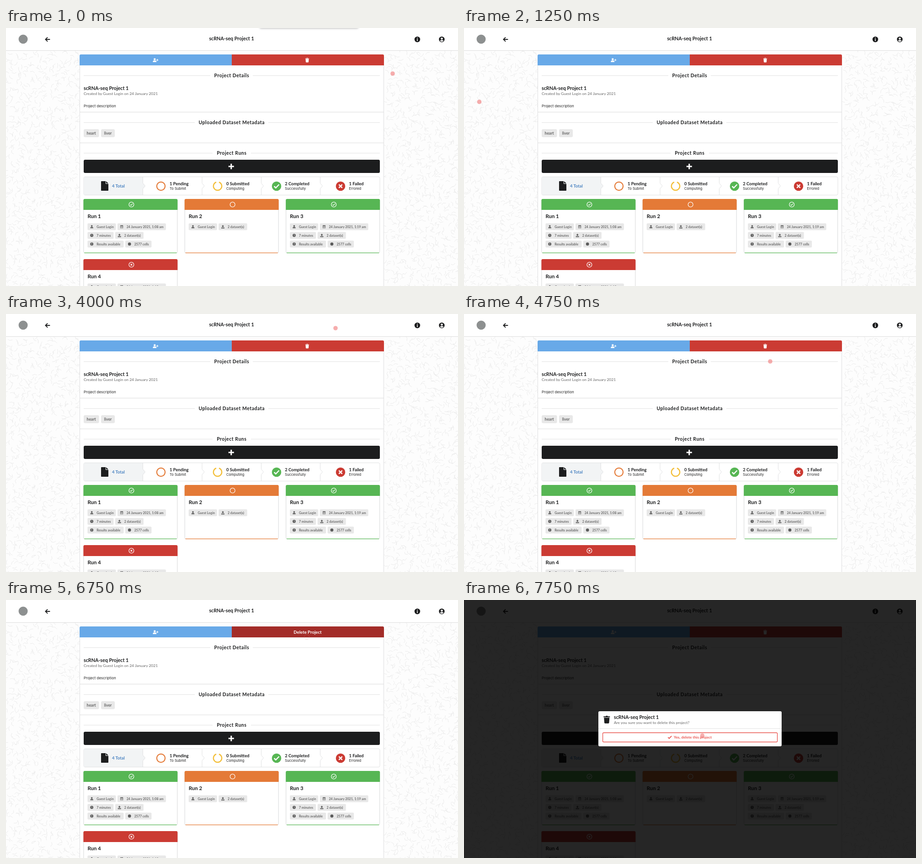
Write an HTML page that moves like this. It is 989 px wide and 566 px high and loops after 8000 ms.

```html
<!DOCTYPE html>
<html lang="en">
<head>
<meta charset="utf-8">
<title>Project page</title>
<style>
  html, body { margin: 0; width: 100%; height: 100%; overflow: hidden; background: #fdfdfd; }
  svg { display: block; width: 989px; height: 566px; }
  text { font-family: Lato, sans-serif; fill: #1c1d1e; }
  .b { font-weight: 700; }
  .mid { text-anchor: middle; }
  .head { font-size: 10.7px; }
  .divider { font-size: 10.5px; letter-spacing: .05em; }
  .sub { font-size: 8.45px; fill: #666; }
  .plain { font-family: Inter, sans-serif; font-size: 7.6px; fill: #222; }
  .step { font-size: 9.4px; }
  .tag { font-size: 8.6px; fill: #666; }
  .tiny { font-size: 7.1px; fill: #6a6a6a; }
  .line { fill: none; stroke: #e0e1e2; }
</style>
</head>
<body>
<svg id="stage" viewBox="0 0 989 566"></svg>
<script>
const RED = '#cb3b33', GREEN = '#57b654', ORANGE = '#e47a37', YELLOW = '#f3bf3b', INK = '#1c1d1e', GREY = '#5c5c5c';
const USER = 'Guest Login';

const rect = (x, y, w, h, fill, rx = 0, extra = '') =>
  `<rect x="${x}" y="${y}" width="${w}" height="${h}" rx="${rx}" fill="${fill}" ${extra}/>`;
const text = (x, y, str, cls, extra = '') => `<text x="${x}" y="${y}" class="${cls}" ${extra}>${str}</text>`;
const disc = (x, y, r, fill) => `<circle cx="${x}" cy="${y}" r="${r}" fill="${fill}"/>`;
const ring = (x, y, r, color, w) => `<circle cx="${x}" cy="${y}" r="${r}" fill="none" stroke="${color}" stroke-width="${w}"/>`;
const stroke = (d, color, w, extra = '') =>
  `<path d="${d}" fill="none" stroke="${color}" stroke-width="${w}" ${extra}/>`;
const at = (x, y, s, body) => `<g transform="translate(${x} ${y}) scale(${s})">${body}</g>`;

// Icons are centred on 0,0 and about 10 units wide
const icon = {
  person: c => disc(0, -2.4, 2.6, c) + `<path d="M-4.6 5V3.6Q-4.6 .8-1.8 .8H1.8Q4.6 .8 4.6 3.6V5Z" fill="${c}"/>`,
  calendar: c => `<path d="M-4.5-4H4.5V5H-4.5ZM-3.4-1.2V3.9H3.4V-1.2Z" fill="${c}" fill-rule="evenodd"/>` +
    stroke('M-2.2-5.5V-3M2.2-5.5V-3M-2.5 1.3H2.5', c, 1.3),
  clock: c => disc(0, 0, 5, c) + stroke('M0-3V.3L2 1.8', '#e8e8e8', 1.2),
  upload: c => `<path d="M0-5.5L4-1H1.4V2.4H-1.4V-1H-4ZM-5 2.5H-2.4V3.5H2.4V2.5H5V5.5H-5Z" fill="${c}"/>`,
  info: c => disc(0, 0, 5, c) + stroke('M0-3.2V.6M0 1.8V3.2', '#e8e8e8', 1.5),
  cell: c => disc(0, 0, 5, c),
  check: c => stroke('M-4.2.2L-1.4 3L4.4-3', c, 2),
  cross: c => stroke('M-3-3L3 3M3-3L-3 3', c, 2.2),
  trash: c => `<path d="M-5-5H-1.8L-1.2-6H1.2L1.8-5H5V-3.6H-5ZM-4.3-2.9H4.3L3.7 5Q3.6 6 2.6 6H-2.6Q-3.6 6-3.7 5Z" fill="${c}"/>`
};

function sprinkles() {
  let seed = 11, d = '';
  const rnd = () => (seed = (seed * 16807) % 2147483647) / 2147483647;
  for (let y = 52; y < 570; y += 10.5)
    for (let x = 0; x < 992; x += 10.5) {
      const px = x + rnd() * 9, py = y + rnd() * 9, a = rnd() * 6.283, b = a + (rnd() < .5 ? 1 : -1) * (.5 + rnd() * .6);
      if (x > 165 && x < 820) continue;
      d += `M${px.toFixed(1)} ${py.toFixed(1)}l${(6 * Math.cos(a)).toFixed(1)} ${(6 * Math.sin(a)).toFixed(1)}` +
        `l${(5 * Math.cos(b)).toFixed(1)} ${(5 * Math.sin(b)).toFixed(1)}`;
    }
  return stroke(d, '#e9e9e9', .9);
}

const divider = (y, label, left, right) =>
  stroke(`M170 ${y}H${left}M${right} ${y}H818`, '#e2e2e2', 1) + text(493.8, y + 3.2, label, 'b mid divider');

function header() {
  return rect(0, 0, 989, 49, '#fff') + stroke('M0 49.5H989', '#dcdcdc', 1) +
    disc(37.5, 24.5, 10, '#8d9090') +
    stroke('M96.3 25H87M91 20.4L86.4 25L91 29.6', INK, 1.9) +
    text(493.5, 27, 'scRNA-seq Project 1', 'b mid head') +
    disc(900, 25, 6.2, INK) + stroke('M900 21.2V23M900 24.2V28.6', '#fff', 1.7) +
    disc(953.5, 25, 6.2, INK) + disc(953.5, 23.3, 2.3, '#fff') +
    '<path d="M949.6 28.2Q950.3 26.4 952 26.4H955Q956.7 26.4 957.4 28.2Q955.8 30 953.5 30T949.6 28.2Z" fill="#fff"/>';
}

function steps() {
  const item = (x, title, note) => text(x, 344.8, title, 'b step') + text(x, 355, note, 'plain');
  const chevrons = [429, 558.5, 687.5].map(x => `M${x} 327V340.5l5 6l-5 6V366`).join('');
  return rect(170, 326.5, 648, 40, '#fff', 3, 'stroke="#e0e1e2"') +
    '<path d="M170.5 327H299.5V340.5L305 346.5L299.5 352.5V366H170.5Z" fill="#f2f4f5"/>' +
    `<path class="line" d="M299.5 327V340.5l5 6l-5 6V366${chevrons}"/>` +
    `<path d="M208 337Q208 336 209 336H218V342H224V356Q224 357 223 357H209Q208 357 208 356ZM219 336L224 341H219Z" fill="${INK}"/>` +
    text(232, 350, '4 Total', 'b step', 'style="fill:#4c84c2"') +
    ring(339, 347, 9.1, ORANGE, 2.2) + item(358, '1 Pending', 'To Submit') +
    stroke('M466 338.3A9.1 9.1 0 1 1 460 338.3', YELLOW, 2.5) + item(482, '0 Submitted', 'Computing') +
    disc(592, 347, 10.3, GREEN) + at(592, 347, 1.25, icon.check('#fff')) + item(610.3, '2 Completed', 'Successfully') +
    disc(732, 347, 10.3, RED) + at(732, 347, 1.2, icon.cross('#fff')) + item(750.5, '1 Failed', 'Errored');
}

const chip = (x, y, w, name, label) => rect(x, y, w, 15, '#e8e8e8', 2) +
  at(x + 9.3, y + 7.4, .68, icon[name](GREY)) + text(x + 19.8, y + 10.1, label, 'b tiny');

function card(x, y, n, color, mark, date) {
  const l = x + 9, row = i => y + 53.5 + 19 * i;
  let s = rect(x + .5, y + .5, 205, 118, '#fff', 3, 'stroke="#d6d7d8"') +
    stroke(`M${x + 2} ${y + 118.3}H${x + 204}`, color, 1.3) +
    `<path d="M${x} ${y + 24}V${y + 3}q0-3 3-3h200q3 0 3 3V${y + 24}Z" fill="${color}"/>` +
    ring(x + 105, y + 12.3, 5.4, '#fff', 1.2) +
    (mark ? at(x + 105, y + 12.3, mark === 'check' ? .62 : .6, icon[mark]('#fff')) : '') +
    text(l, y + 41.5, 'Run ' + n, 'b', 'font-size="11.4"') +
    chip(l, row(0), 62, 'person', USER);
  if (!date) return s + chip(l + 65.5, row(0), 62.5, 'upload', '2 dataset(s)');
  return s + chip(l + 65.5, row(0), 106, 'calendar', `24 January 2021, ${date} am`) +
    chip(l, row(1), 57, 'clock', '7 minutes') + chip(l + 60.5, row(1), 62, 'upload', '2 dataset(s)') +
    chip(l, row(2), 79, 'info', 'Results available') + chip(l + 82.5, row(2), 57.5, 'cell', '2577 cells');
}

function page() {
  return sprinkles() + header() +
    rect(161.5, 58.5, 665, 520, '#fff', 3, 'stroke="#dededf"') +
    '<path d="M161 82V61q0-3 3-3H494V82Z" fill="#68a9e8"/>' +
    '<path id="del" d="M494 82V58H824q3 0 3 3V82Z"/>' +
    at(325.3, 70.5, .85, icon.person('#fff')) + stroke('M329 70.3H333.4M331.2 68.1V72.5', '#fff', 1.3) +
    `<g id="bin">${at(659, 70.5, .82, icon.trash('#fff'))}</g>` +
    text(660, 73.7, 'Delete Project', 'b mid', 'id="delText" font-size="9.6" style="fill:#fff"') +
    divider(104.5, 'Project Details', 447, 540) +
    text(170, 135.8, 'scRNA-seq Project 1', 'b head') +
    text(170, 146.7, `Created by ${USER} on 24 January 2021`, 'sub') +
    text(170, 173.7, 'Project description', 'plain', 'style="font-size:7.95px"') +
    stroke('M162 184.5H826M162 252H826', '#dcdcdc', 1) +
    divider(207.5, 'Uploaded Dataset Metadata', 413, 574) +
    rect(170, 222, 33.5, 17.5, '#e8e8e8', 3) + text(186.7, 233.7, 'heart', 'b mid tag') +
    rect(208, 222, 30, 17.5, '#e8e8e8', 3) + text(223, 233.7, 'liver', 'b mid tag') +
    divider(274.5, 'Project Runs', 452, 536) +
    rect(170, 289, 648, 29, INK, 3) + stroke('M486.8 303.7H498.8M492.8 297.7V309.7', '#fff', 3) +
    steps() +
    card(169.4, 375, 1, GREEN, 'check', '1:08') + card(390.7, 375, 2, ORANGE) +
    card(612.2, 375, 3, GREEN, 'check', '1:19') + card(169.4, 507, 4, RED, 'cross', '1:19');
}

function modal() {
  const pink = '#e9554f';
  return rect(0, 0, 989, 566, '#000', 0, 'opacity=".85"') +
    rect(294, 244, 401, 77, '#fff', 3) + stroke('M294 282H695', '#dfdfdf', 1) +
    at(312.3, 262.3, 1.4, icon.trash(INK)) +
    text(328, 261.3, 'scRNA-seq Project 1', 'b head') +
    text(328, 271.8, 'Are you sure you want to delete this project?', 'sub') +
    rect(303.6, 291.2, 382, 20.3, 'none', 2, `stroke="${pink}" stroke-width="1.4"`) +
    at(450.2, 301, .9, icon.check(pink)) +
    text(459, 304.2, 'Yes, delete this project', 'b', `font-size="8.3" style="fill:${pink}"`);
}

const stage = document.getElementById('stage');
stage.innerHTML = page() +
  `<g id="shade">${rect(555, -6, 216, 7, '#bbb', 3, 'style="filter:blur(2px)"')}</g>` +
  `<g id="modal">${modal()}</g>` +
  '<circle id="dot" r="4.8" fill="#ee5c5c" fill-opacity=".5"/><circle id="press" r="5.6" fill="none"/>';
const el = id => document.getElementById(id);
const show = (id, on) => { el(id).style.display = on ? '' : 'none'; };

// Pointer path: time, x, y
const path = [
  [0, 846, 100], [250, 720, 128], [750, 150, 184], [1000, 30, 186], [1250, 33.5, 162],
  [1500, 75, 200], [2000, 370, 265], [2500, 650, 127], [2750, 672, 98], [3000, 676, 74], [3750, 700, 64],
  [4000, 721, 31], [4250, 718, 72], [4500, 694, 140], [4750, 670, 104], [5000, 661, 78],
  [5250, 658, 97], [5500, 661, 78], [5750, 660.5, 69], [6500, 660.5, 69], [6750, 658, 81], [7000, 658, 80],
  [7250, 640, 130], [7500, 585, 225], [7750, 521.5, 297.5]
];

function pointer(t) {
  const i = path.findIndex(p => p[0] > t);
  if (i < 0) return path[path.length - 1].slice(1);
  const [t0, x0, y0] = path[i - 1], [t1, x1, y1] = path[i], k = (t - t0) / (t1 - t0);
  return [x0 + (x1 - x0) * k, y0 + (y1 - y0) * k];
}

function draw(now) {
  const t = Math.floor(now % 8000 / 250) * 250;
  const [x, y] = pointer(t);
  const pressed = t === 6750, open = t >= 7000, pressing = pressed || t === 7000;
  const hover = !open && (t >= 5000 || (x > 494 && x < 827 && y > 58 && y < 82));
  el('del').setAttribute('fill', pressed ? '#a32c28' : hover ? '#be2d26' : RED);
  show('bin', !hover);
  show('delText', hover);
  show('shade', t < 250);
  show('modal', open);
  show('dot', !pressing);
  show('press', pressing);
  for (const id of ['dot', 'press']) {
    el(id).setAttribute('cx', x);
    el(id).setAttribute('cy', y);
  }
  el('press').setAttribute('stroke', open ? '#6b2927' : 'rgba(225,120,115,.25)');
  requestAnimationFrame(draw);
}
requestAnimationFrame(draw);
</script>
</body>
</html>
```
